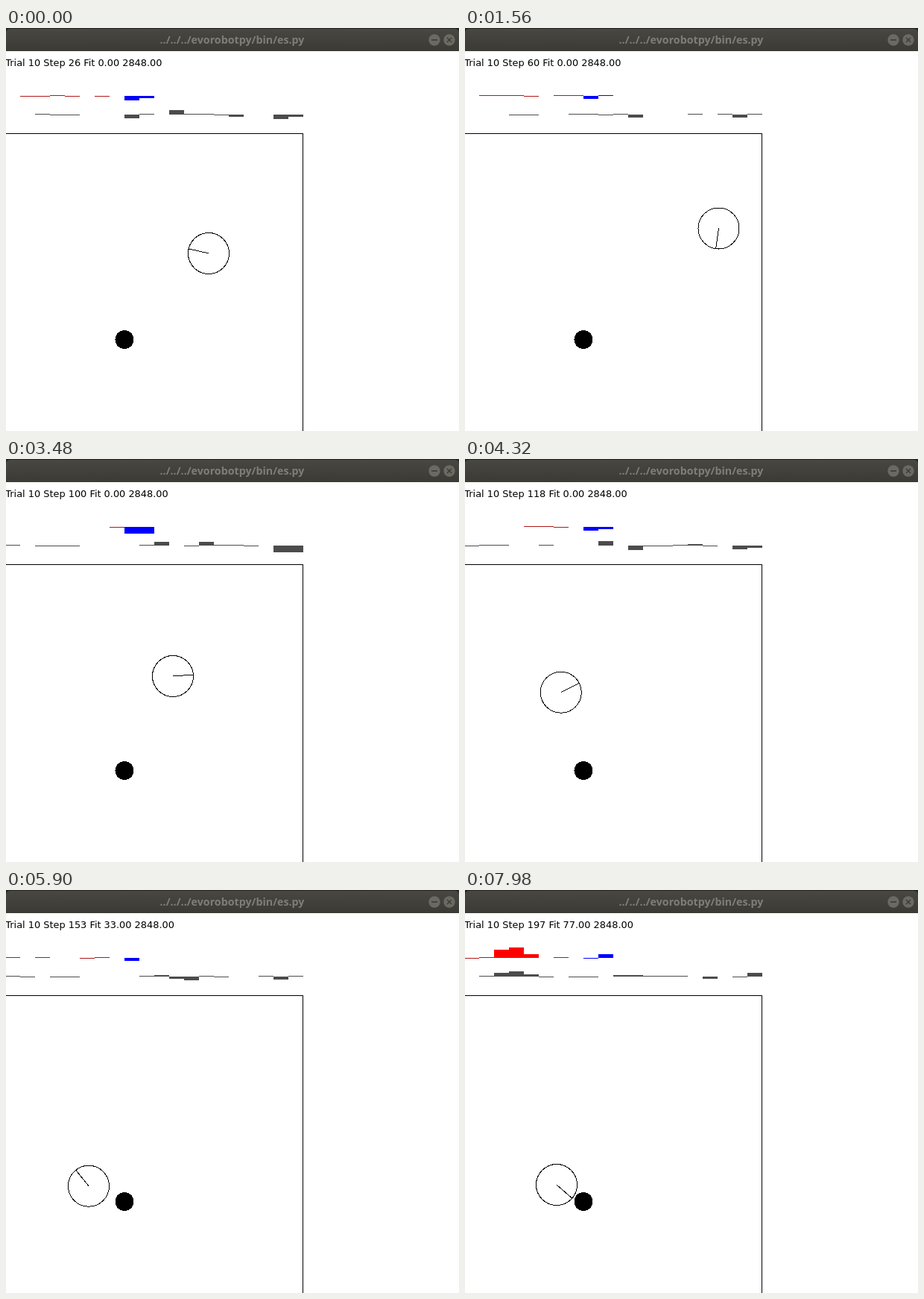
Write an HTML page that moves like this. It is 608 px wide and 540 px high and loops after 8 s.

```html
<!DOCTYPE html>
<html lang="en">
<head>
<meta charset="utf-8">
<title>Robot simulation</title>
<style>
  html, body { margin: 0; width: 100%; height: 100%; overflow: hidden; background: #fff; }
  svg { display: block; }
  .title { font: bold 14.25px "Open Sans", "Noto Sans", sans-serif; fill: #807d76; text-anchor: middle; }
  .status { font: 12.9px "DejaVu Sans", sans-serif; }
  .crisp { shape-rendering: crispEdges; }
  .outline { fill: none; stroke: #000; }
</style>
</head>
<body>
<svg width="608" height="540" viewBox="0 0 608 540">
  <linearGradient id="shade" x2="0" y2="1">
    <stop stop-color="#484741"/>
    <stop offset="1" stop-color="#3b3a35"/>
  </linearGradient>
  <rect width="608" height="12" fill="#262521"/>
  <path d="M0 31V7q0-6 6-6H602q6 0 6 6V31z" fill="url(#shade)"/>
  <text class="title" x="303.5" y="21">../../../evorobotpy/bin/es.py</text>
  <g fill="#6b6962">
    <circle cx="575" cy="16" r="7.7"/>
    <circle cx="595" cy="16" r="7.7"/>
  </g>
  <path d="M571 16h8M592 13l6 6m0-6l-6 6" stroke="#3a3934" stroke-width="1.3"/>
  <text class="status" id="status" x="-0.7" y="51"></text>
  <g class="crisp" id="bars"></g>
  <g class="crisp">
    <path class="outline" d="M0 141.5H398.5V540"/>
    <circle cx="159" cy="417.5" r="12.5"/>
    <g class="outline" id="robot">
      <circle r="27.5"/>
      <path id="pointer"/>
    </g>
  </g>
</svg>
<script>
const LOOP = 8000;
const BALL = { x: 159, y: 417.5, r: 12.5 };
const ROBOT_RADIUS = 27.5;
const RAD = Math.PI / 180;
const byId = id => document.getElementById(id);

// Waypoints of the robot: step, x, y, heading in degrees
const path = [
  [26, 272, 302, 193], [43, 330, 297, 155], [60, 340.5, 268.5, 98], [72, 349, 264, 32],
  [82, 341.5, 277, -9], [100, 224, 291, -4], [114, 140, 305.5, -18], [136, 106.5, 352, -75],
  [154, 111, 398, -132], [168, 105, 388, -176], [182, 107, 380, -238], [197, 123, 395, -319]
];

// Three steps every 140 ms, held for 20, 20 and 100 ms
function stepAt(time) {
  const t = time + 20;
  return 25 + 3 * Math.floor(t / 140) + Math.min(2, Math.floor(t % 140 / 20));
}

function slope(i, channel) {
  const a = path[Math.max(0, i - 1)], b = path[Math.min(path.length - 1, i + 1)];
  return (b[channel] - a[channel]) / (b[0] - a[0]);
}

// Smooth cubic through the waypoints
function pose(step) {
  let i = 0;
  while (i < path.length - 2 && step >= path[i + 1][0]) i++;
  const a = path[i], b = path[i + 1], span = b[0] - a[0];
  const u = (step - a[0]) / span, v = 1 - u;
  const [x, y, heading] = [1, 2, 3].map(c =>
    a[c] * v * v * (1 + 2 * u) + b[c] * u * u * (3 - 2 * u)
    + span * u * v * (v * slope(i, c) - u * slope(i + 1, c)));
  return { x, y, heading };
}

// Left and right wheel levels that produce the motion at this step
function wheels(step) {
  const a = pose(step - 0.5), b = pose(step + 0.5), angle = pose(step).heading * RAD;
  const drive = ((b.x - a.x) * Math.cos(angle) + (b.y - a.y) * Math.sin(angle)) / 0.74;
  const turn = (b.heading - a.heading) / 1.6;
  return [drive + turn, drive - turn];
}

// Six proximity sensors fan out over the front half; the two rear ones stay quiet
function proximity(robot, slot) {
  if (slot > 5) return 0;
  const dx = BALL.x - robot.x, dy = BALL.y - robot.y;
  const gap = Math.hypot(dx, dy) - BALL.r - ROBOT_RADIUS;
  const offset = Math.atan2(dy, dx) - (robot.heading + 90 - 36 * slot) * RAD;
  return 19 * Math.exp(-gap / 10) * Math.max(0, Math.cos(offset)) ** 3;
}

function random(seed) {
  const n = Math.sin(seed * 12.9898) * 43758.5453;
  return n - Math.floor(n);
}

function flicker(seed) {
  const r = random(seed);
  return r < 0.22 ? -1 : r < 0.44 ? 1 : 0;
}

function makeBars(count, colour) {
  return Array.from({ length: count }, (_, slot) => {
    const bar = document.createElementNS('http://www.w3.org/2000/svg', 'rect');
    bar.setAttribute('x', 20 * slot - 1);
    bar.setAttribute('width', 20);
    bar.setAttribute('fill', colour(slot));
    return byId('bars').appendChild(bar);
  });
}

function setBars(bars, levels, baseline, step) {
  bars.forEach((bar, slot) => {
    const level = Math.round(levels[slot]) || flicker(step * 31 + slot + baseline);
    bar.setAttribute('y', baseline - Math.max(0, level));
    bar.setAttribute('height', Math.abs(level));
    if (slot < 8 && baseline === 91) bar.setAttribute('fill', Math.abs(level) > 1 ? '#f00' : '#b01818');
  });
}

const inputs = makeBars(10, slot => slot < 8 ? '#f00' : '#00f');
const neurons = makeBars(20, () => '#4c4c4c');

function draw(time) {
  const step = stepAt(time), robot = pose(step), motors = wheels(step);
  const sensed = Array.from({ length: 8 }, (_, slot) => proximity(robot, slot));
  const hidden = Array.from({ length: 10 }, (_, k) => 7 * (2 * random(step * 17 + k) - 1) ** 5);

  setBars(inputs, [...sensed, ...motors], 91, step);
  setBars(neurons, [...sensed.map(s => s * 0.5), ...hidden, ...motors], 116, step);

  const fit = Math.max(0, step - 120).toFixed(2);
  byId('status').textContent = `Trial 10 Step ${step} Fit ${fit} 2848.00`;

  const angle = robot.heading * RAD;
  byId('robot').setAttribute('transform', `translate(${robot.x} ${robot.y})`);
  byId('pointer').setAttribute('d', `M0 0L${27 * Math.cos(angle)} ${27 * Math.sin(angle)}`);
}

const start = performance.now();
function tick() {
  draw((performance.now() - start) % LOOP);
  requestAnimationFrame(tick);
}
tick();
</script>
</body>
</html>
```
